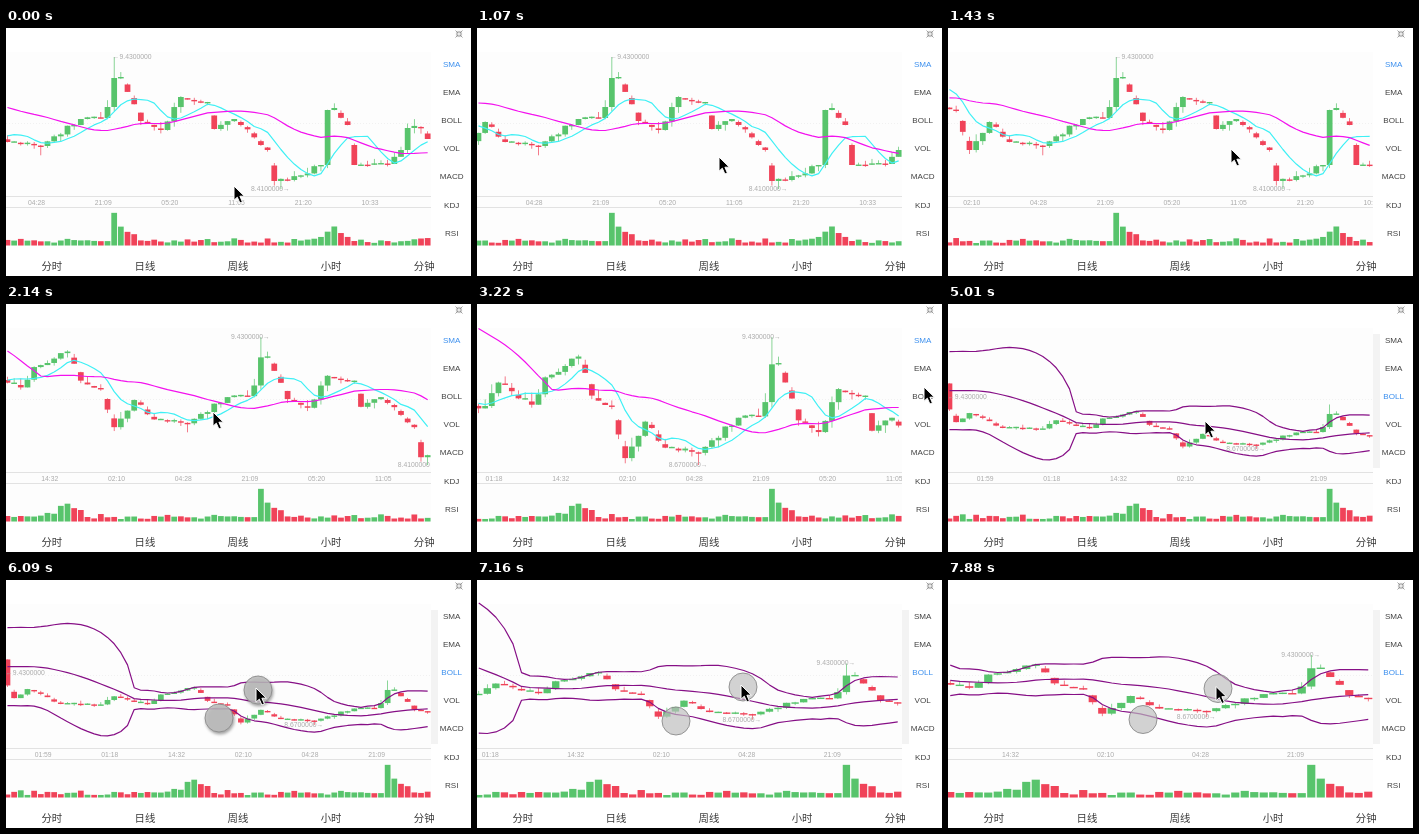
These frames come from a looping animation (465 px wide and 248 px high, 8000 ms). An HTML page:

```html
<!DOCTYPE html>
<html lang="zh">
<head>
<meta charset="utf-8">
<style>
html, body { margin: 0; width: 100%; height: 100%; overflow: hidden; background: #fff; }
svg { position: absolute; left: 0; top: 0; display: block; }
.axis { font: 6.8px "Liberation Sans", Arial, sans-serif; fill: #ababab; }
.menu { font: 8.1px "Liberation Sans", Arial, sans-serif; fill: #444; text-anchor: middle; }
.menu .on { fill: #3b8fee; }
.tabs { font: 10.4px "Noto Sans CJK SC", "Noto Sans CJK", sans-serif; fill: #3a3a3a; text-anchor: middle; }
.line { fill: none; stroke-width: 1.2; stroke-linejoin: round; }
.touches { fill: #bdbdbd; fill-opacity: .68; stroke: #8c8c8c; stroke-width: .9; }
.touches.pressed { fill-opacity: .85; filter: drop-shadow(1px 2px 1.6px #0006); }
</style>
</head>
<body>
<svg width="465" height="248" viewBox="0 0 465 248">
  <clipPath id="plot"><rect y="20" width="425" height="198"/></clipPath>
  <rect y="24" width="425" height="194" fill="#fdfdfd"/>
  <rect id="strip" x="425" y="30" width="7" height="134" fill="#f3f3f3"/>
  <path d="M0 95.5H425" stroke="#ececec" stroke-width=".7" stroke-dasharray="1 2"/>
  <path d="M0 168.5H425M0 179.5H425" stroke="#e2e2e2"/>
  <g id="chart" clip-path="url(#plot)"></g>
  <g class="menu" id="menu"></g>
  <g class="tabs" id="tabs"></g>
  <g id="corners" fill="none" stroke="#888" stroke-width=".8"></g>
  <g class="touches" id="touches"><circle r="14"/><circle r="14"/></g>
  <path id="cursor" d="M0 0V14.2L3.3 11.2L5.9 17L8.4 15.9L5.9 10.2H10.4Z" stroke="#fff" stroke-linejoin="round"/>
</svg>
<script>
const $ = id => document.getElementById(id);
const GREEN = '#58c46c', RED = '#f04359', PURPLE = '#860f86';

// Candles are numbered from the price peak at 0.
const OLDEST = -85, FIRST = -57, LAST = 47;
const PEAK = 0, DIP = -11, TROUGH = 25;

// Price levels run downwards: a smaller level is a higher price.
const TOP = 29, SHALLOW = 127.3, DEEP = 161;
const wickEnds = { [FIRST]: 13, [PEAK]: TOP, [DIP]: SHALLOW, [TROUGH]: DEEP };

// Turning points of the closing price: [candle, level].
const turns = [
  [OLDEST, 140], [-58, -75], [FIRST, 40], [-56, 68], [-54, 48], [-49, 80], [-43, 82], [-41, 64],
  [-36, 81], [-34, 60], [-29, 44], [-27, 74], [-24, 82], [-22, 122], [-19, 94], [-16, 114],
  [DIP, 118], [-5, 91], [-2, 90], [-1, 79], [PEAK, 50], [1, 49], [4, 93], [7, 102], [10, 69],
  [14, 74], [15, 101], [18, 91], [23, 122], [24, 153], [26, 152], [31, 137], [32, 82], [33, 80],
  [35, 97], [36, 137], [41, 136], [43, 122], [44, 100], [46, 100], [LAST, 111]];

const noise = n => { const v = Math.sin(n * 127.1 + 11.7) * 43758.5453; return v - Math.floor(v); };

function close(k) {
  const i = Math.max(1, turns.findIndex(p => p[0] >= k));
  const [[k0, a], [k1, b]] = [turns[i - 1], turns[i]];
  const turning = k === k0 || k === k1;
  return a + (b - a) * (k - k0) / (k1 - k0) + (turning ? 0 : 5 * (noise(k) - 0.5));
}

// Trading picks up around the three big moves.
const bell = (k, at) => 12 * Math.exp(-(((k - at) / 2.2) ** 2));
const volume = k => 2.5 + 5 * noise(k + 700) ** 1.3
  + bell(k, -29) + bell(k, 33) + (k < PEAK ? 0 : 30 * Math.exp(-k / 1.6));

function candle(k) {
  const end = close(k), before = close(k - 1);
  const rising = end <= before;
  const open = rising ? before : (before + end) / 2;
  const top = Math.min(open, end), bottom = Math.max(open, end);
  const end0 = wickEnds[k], floor = k < 20 ? 126 : 159;
  return {
    k, top, bottom, color: rising ? GREEN : RED, volume: volume(k),
    high: end0 < top ? end0 : top - 7 * noise(k + 50) ** 2,
    low: end0 > bottom ? end0 : Math.max(bottom, Math.min(bottom + 6 * noise(k + 300) ** 2, floor))
  };
}
const candles = Array.from({ length: LAST - FIRST + 1 }, (_, i) => candle(FIRST + i));

// Indicators
const mean = list => list.reduce((a, b) => a + b) / list.length;
const recent = (k, n) => Array.from({ length: n }, (_, i) => close(k - i));
const average = n => k => mean(recent(k, n));
const band = side => k => {
  const list = recent(k, 20), m = mean(list);
  return m + side * Math.sqrt(mean(list.map(v => (v - m) ** 2)));
};
const smaLines = [[average(7), '#3ff0f5'], [average(25), '#f312ee']];
const bollLines = [-2, 0, 2].map(side => [band(side), PURPLE]);

const times = ['01:59', '01:18', '14:32', '02:10', '04:28', '21:09', '05:20', '11:05', '21:20', '10:33'];

// View: last visible candle, y of the peak and of the lowest price, candle spacing.
const STEP = 6.67;
const sma = (last, hi) => ({ last, hi, lo: DEEP, step: STEP });
const boll = (last, hi, lo, step = STEP) => ({ last, hi, lo, step, boll: true });
const zoom = step => boll(6, 75 + (9.5 - step) * 9, 137 + (9.5 - step) * 2.8, step);

const start = sma(LAST, 29), far = sma(19, 33), bands = boll(19, 87, 140), wide = zoom(STEP);

// One scene per beat: view, cursor, and half the spread of two fingers.
const CENTER = [232.5, 124];
const pinch = (v, dx, dy) => [v, [CENTER[0] + dx - 2, CENTER[1] + dy - 2], [dx, dy]];
const scenes = [
  [start, [228, 158]], [start, [200, 136]], [start, [212, 135.5]],
  [sma(43, 29), [242, 129]], [sma(38, 29), [283, 121]],
  [sma(31, 33), [166, 112]], [sma(25, 33), [207, 108]],
  [far, [243, 109]], [far, [368, 83]], [far, [447, 83]],
  [bands, [447, 90]], [bands, [308, 120]], [bands, [219, 126]],
  [wide, [306, 124]], [wide, [257, 117]], [wide, [242, 113]], [wide, [249, 108]],
  pinch(wide, 19.5, -14), pinch(wide, 18.5, -16), pinch(zoom(7.7), 27.5, -18),
  pinch(zoom(8.55), 33.5, -17), pinch(zoom(9.05), 35.5, -16.5), pinch(zoom(9.5), 37.5, -15.5)
];
const LOOP = 8000, BEAT = 358.2, LEAD = 10;

const text = (x, y, s, extra = '') => `<text x="${x}" y="${y}" ${extra}>${s}</text>`;
const rect = (x, y, w, h, color) =>
  `<rect x="${x.toFixed(2)}" y="${y.toFixed(2)}" width="${w.toFixed(2)}" height="${h.toFixed(2)}" fill="${color}"/>`;

function drawChart(v) {
  const { last, hi, lo, step } = v;
  const bottom = last >= TROUGH ? DEEP : SHALLOW;
  const x = k => 425 - (last - k + 0.5) * step;
  const y = level => hi + (level - TOP) * (lo - hi) / (bottom - TOP);
  const shown = candles.filter(c => c.k <= last && x(c.k) > 0);
  const w = step * 0.86;
  let out = '';
  for (const c of shown) {
    const cx = x(c.k), left = cx - w / 2;
    out += rect(cx - 0.35, y(c.high), 0.7, y(c.low) - y(c.high), c.color);
    out += rect(left, y(c.top), w, Math.max(1.4, y(c.bottom) - y(c.top)), c.color);
    out += rect(left, 217.5 - c.volume, w, c.volume, c.color);
  }
  for (const [level, color] of v.boll ? bollLines : smaLines) {
    const points = shown.map(({ k }) => `${x(k).toFixed(2)},${y(level(k)).toFixed(2)}`);
    out += `<polyline class="line" points="${points.join(' ')}" stroke="${color}"/>`;
  }

  const mark = (k, price) => {
    const cx = x(k), ty = y(wickEnds[k]) + 1.9;
    return cx < 212 ? text(cx - 1.5, ty, '←' + price) : text(cx + 9, ty, price + '→', 'text-anchor="end"');
  };
  out += '<g class="axis">';
  out += mark(shown[0].k === FIRST ? FIRST : PEAK, '9.4300000');
  out += bottom === DEEP ? mark(TROUGH, '8.4100000') : mark(DIP, '8.6700000');
  times.forEach((t, i) => out += text(x(-1.65 + (i - 5) * 10), 176.5, t, 'text-anchor="middle"'));
  $('chart').innerHTML = out + '</g>';
}

const move = (el, [x, y]) => el.setAttribute('transform', `translate(${x} ${y})`);

$('menu').innerHTML = ['SMA', 'EMA', 'BOLL', 'VOL', 'MACD', 'KDJ', 'RSI']
  .map((s, i) => text(445.7, 39 + i * 28.1, s)).join('');
$('tabs').innerHTML = ['分时', '日线', '周线', '小时', '分钟']
  .map((s, i) => text(45.8 + i * 93.1, 242.4, s)).join('');
$('corners').innerHTML = [0, 90, 180, 270]
  .map(a => `<path d="M-3.5-3.5l2.6 2.6v-2.2m0 2.2h-2.2" transform="translate(453 6) rotate(${a})"/>`).join('');

let current = -1, drawn;
function tick() {
  const t = performance.now() % LOOP;
  const index = Math.min(scenes.length - 1, Math.floor((t + LEAD) / BEAT));
  if (index !== current) {
    const [v, pointer, spread] = scenes[current = index];
    if (v !== drawn) {
      drawChart(drawn = v);
      $('strip').style.display = v.boll ? '' : 'none';
      [...$('menu').children].forEach((el, i) => el.classList.toggle('on', i === (v.boll ? 2 : 0)));
    }
    move($('cursor'), pointer);
    const touches = $('touches');
    touches.style.display = spread ? '' : 'none';
    touches.classList.toggle('pressed', v === wide);
    if (spread) [1, -1].forEach((side, i) =>
      move(touches.children[i], CENTER.map((c, j) => c + side * spread[j])));
  }
  requestAnimationFrame(tick);
}
tick();
</script>
</body>
</html>
```
